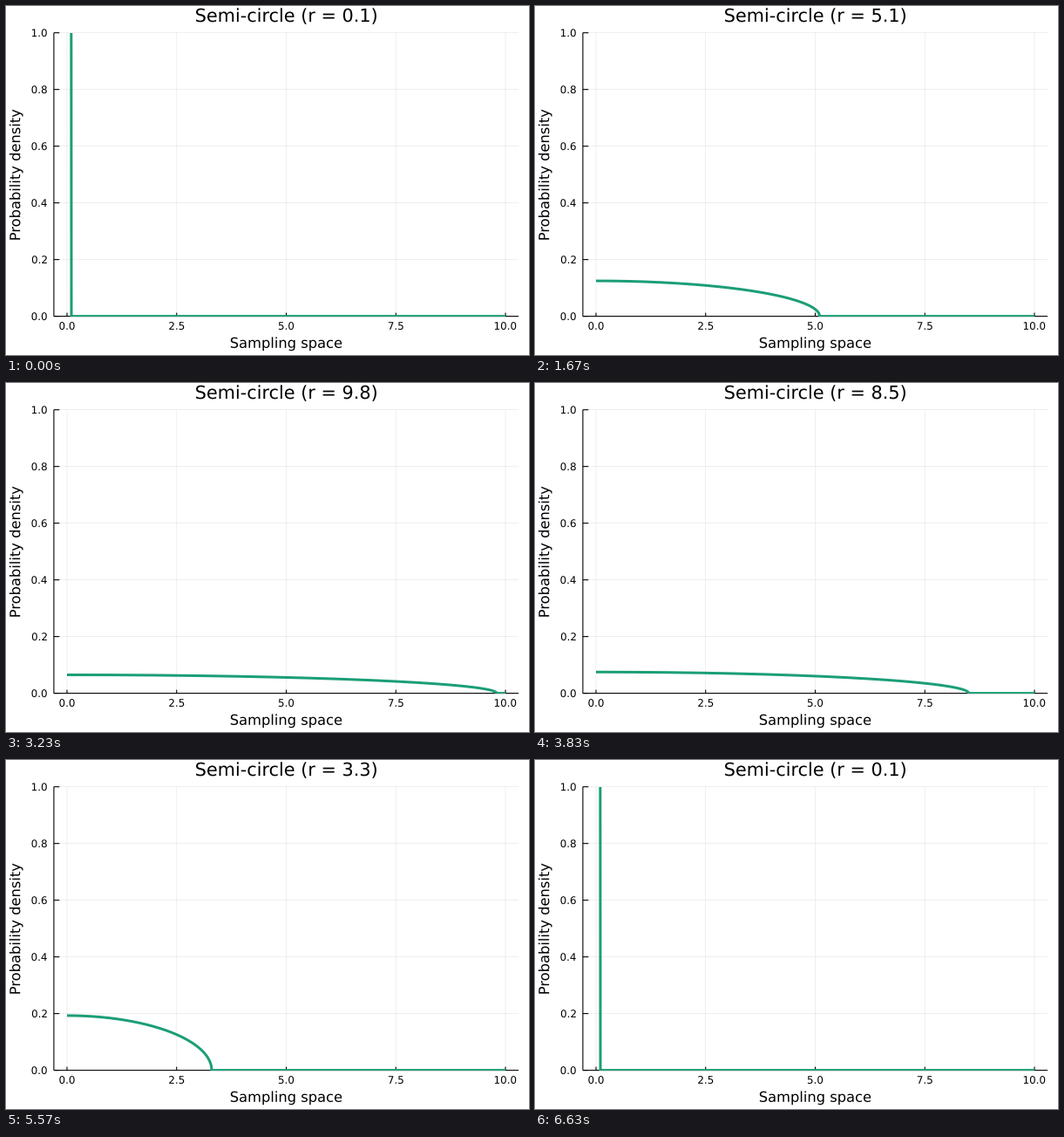
Animation, 600 px wide and 400 px high, one loop 6.66 s. Source, as a matplotlib script:

```python
import numpy as np
import matplotlib.pyplot as plt
from matplotlib.animation import FuncAnimation
from matplotlib.patches import PathPatch, Rectangle
from matplotlib.textpath import TextPath
from matplotlib.transforms import Affine2D

plt.rcParams.update({
    "font.family": "DejaVu Sans",
    "path.snap": False,
    "lines.solid_capstyle": "butt",
    "lines.solid_joinstyle": "round",
})

W, H, DPI = 600, 400, 72
LEFT, RIGHT, TOP, BOTTOM = 54.9, 588.1, 30.7, 355.6
MID_X, MID_Y = (LEFT + RIGHT) / 2, (TOP + BOTTOM) / 2
TITLE, GUIDE, TICK = 20.8, 16.3, 11.9
GREEN = "#1b9e77"

LOOP_MS, FRAME_MS = 6660, 20
RISE = 100
STEP_MS = LOOP_MS / (2 * RISE)

# the stage is measured in pixels, y pointing down
fig = plt.figure(figsize=(W / DPI, H / DPI), dpi=DPI, facecolor="white")
ax = fig.add_axes([0, 0, 1, 1])
ax.set(xlim=(0, W), ylim=(H, 0))
ax.axis("off")


def px(x):
    return LEFT + (x + 0.3) / 10.6 * (RIGHT - LEFT)


def py(y):
    return BOTTOM - y * (BOTTOM - TOP)


def line(x0, y0, x1, y1, lw=1.1, alpha=1):
    ax.plot([x0, x1], [y0, y1], color="black", lw=lw, alpha=alpha)


def grid_line(*ends):
    line(*ends, lw=0.6, alpha=0.1)


def glyphs(x, y, text, size, align=0.5, angle=0):
    """Outline of text with its baseline at (x, y)."""
    path = TextPath((0, 0), text, size=size)
    box = path.get_extents()
    place = (Affine2D().translate(-box.x0 - align * box.width, 0)
             .scale(1, -1).rotate_deg(-angle).translate(x, y))
    return place.transform_path(path)


def label(*args, **kw):
    return ax.add_patch(PathPatch(glyphs(*args, **kw), fc="black", lw=0))


for v in np.linspace(0, 10, 5):
    x = px(v)
    grid_line(x, TOP, x, BOTTOM)
    line(x, BOTTOM, x, BOTTOM - 4)
    label(x, 370.9, f"{v:.1f}", TICK)
for v in np.linspace(0, 1, 6):
    y = py(v)
    grid_line(LEFT, y, RIGHT, y)
    line(LEFT, y, LEFT + 6.4, y)
    label(46.8, y + 4.4, f"{v:.1f}", TICK, align=1)
line(LEFT, BOTTOM, RIGHT, BOTTOM)
line(LEFT, BOTTOM, LEFT, TOP)

label(MID_X, 391.8, "Sampling space", GUIDE)
label(16.2, MID_Y, "Probability density", GUIDE, angle=90)
title = label(MID_X, 18.1, "Semi-circle", TITLE)

xs = np.linspace(0, 10, 1001)
curve, = ax.plot([], [], color=GREEN, lw=3, zorder=5)
curve.set_clip_path(Rectangle((LEFT, TOP), RIGHT - LEFT, BOTTOM - TOP,
                              transform=ax.transData))


def density(x, r):
    return 2 / (np.pi * r**2) * np.sqrt(np.maximum(r**2 - x**2, 0))


def update(i):
    # radius climbs 0.1 to 10.0 in steps, then falls back the same way
    step = int((i + 0.75) * FRAME_MS / STEP_MS)
    r = min(step + 1, 2 * RISE - step) / 10
    curve.set_data(px(xs), py(density(xs, r)))
    title.set_path(glyphs(MID_X, 18.1, f"Semi-circle (r = {r:.1f})", TITLE))
    return curve, title


anim = FuncAnimation(fig, update, frames=LOOP_MS // FRAME_MS,
                     interval=FRAME_MS, repeat=True, repeat_delay=0)
plt.show()
```
